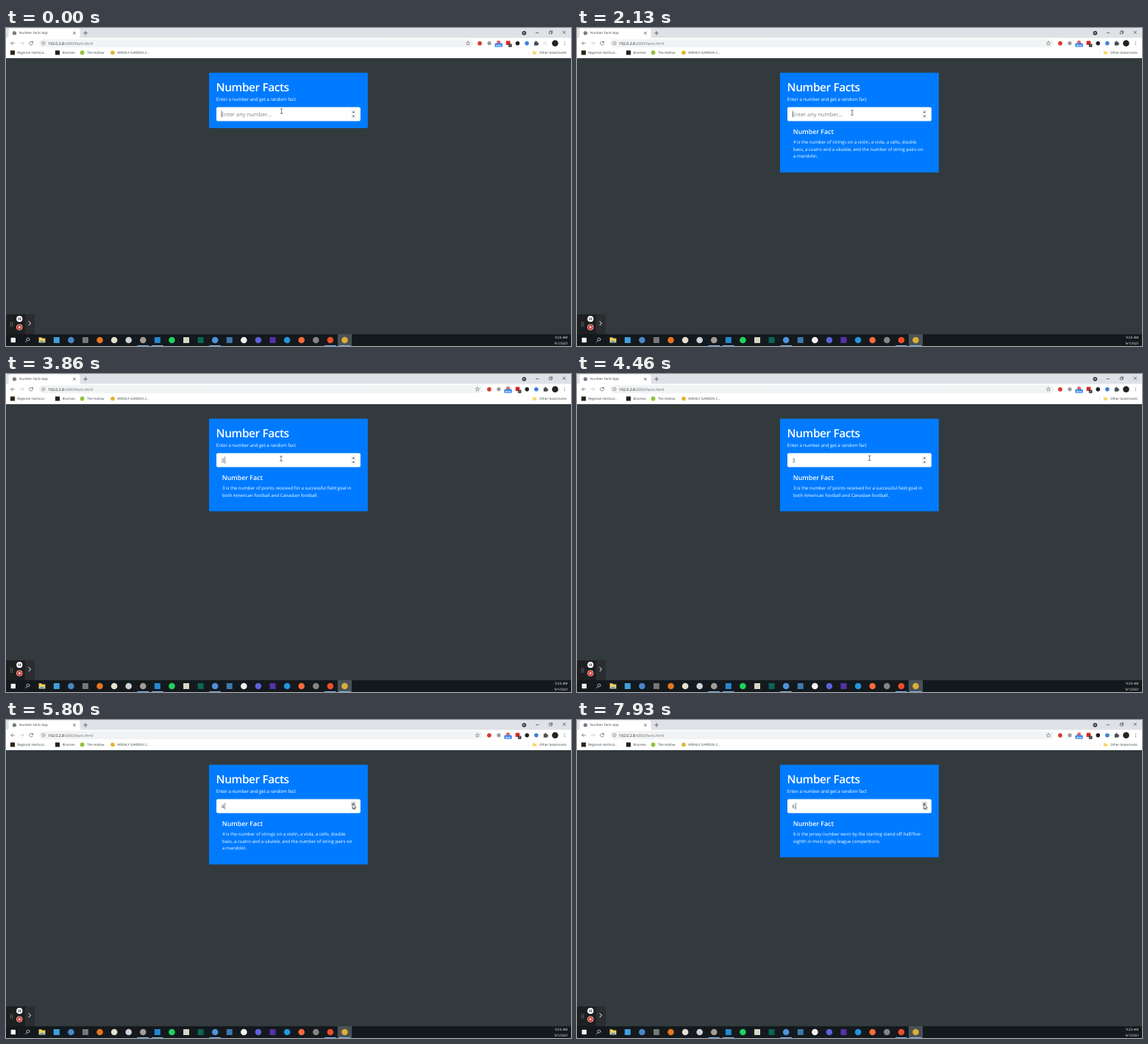
An HTML page that plays this animation: 768 by 432 pixels, repeating every 8000 ms.

```html
<!DOCTYPE html>
<html lang="en">
<head>
<meta charset="utf-8">
<title>Number Facts App</title>
<style>
  html, body { margin: 0; width: 100%; height: 100%; overflow: hidden; background: #333a3e; }
  svg { display: block; width: 100vw; height: 100vh; }
  text { font-family: "Open Sans", "Noto Sans", sans-serif; text-rendering: geometricPrecision; white-space: pre; }
  .heading { font-weight: 600; letter-spacing: -0.026em; }
  .line { fill: none; stroke-linecap: round; stroke-linejoin: round; }
</style>
</head>
<body>
<svg id="stage" viewBox="0 0 768 432"></svg>
<script>
const LOOP = 8000, BLINK = 580;
const stage = document.getElementById('stage');

const rect = (x, y, w, h, fill, r = 0, extra = '') =>
  `<rect x="${x}" y="${y}" width="${w}" height="${h}" rx="${r}" fill="${fill}" ${extra}/>`;
const disc = (x, y, r, fill, extra = '') => `<circle cx="${x}" cy="${y}" r="${r}" fill="${fill}" ${extra}/>`;
const box = (x, y, size, fill) => rect(x - size / 2, y - size / 2, size, size, fill, 0.6);
const line = (d, color, width = 0.7, extra = '') =>
  `<path class="line" d="${d}" stroke="${color}" stroke-width="${width}" ${extra}/>`;
const shape = (d, fill, extra = '') => `<path d="${d}" fill="${fill}" ${extra}/>`;
const text = (x, y, size, fill, content, extra = '') =>
  `<text x="${x}" y="${y}" font-size="${size}" fill="${fill}" ${extra}>${content}</text>`;
const folder = (x, y, w, h, fill) =>
  shape(`M${x} ${y}h${w * 0.4}l${w * 0.1} ${h * 0.16}h${w * 0.5}v${h * 0.84}h${-w}z`, fill);

function tabStrip() {
  return rect(0, 0, 768, 14, '#dee1e6') +
    shape('M1 14Q3.5 14 3.5 11V3Q3.5 0.5 6 0.5H98Q100.5 0.5 100.5 3V11Q100.5 14 103 14Z', '#fff') +
    disc(11.5, 6.8, 2.6, '#5f6368') +
    line('M9.6 5.8q1.2 .2 1.6 1.2t1.4 1.2M11.8 4.6q0 1.2 1.6 1.3', '#fff', 0.5) +
    text(17.8, 8.4, 4.5, '#3c4043', 'Number Facts App') +
    line('M91.4 5.4l3 3m0-3l-3 3', '#3c4043') +
    line('M105.6 6.9h5M108.1 4.4v5', '#3c4043') +
    disc(704.3, 6.8, 2.9, '#3c4043') + shape('M702.9 6h2.8l-1.4 1.8z', '#dee1e6') +
    line('M720.3 6.6h3.6', '#222', 0.6) +
    line('M738.6 4.9h3v3h-3zM739.6 4.9v-1h3v3h-1', '#222', 0.5) +
    line('M756.9 4l3.6 3.6m0-3.6l-3.6 3.6', '#222', 0.6);
}

function extensions() {
  return line('M628 18l.8 1.8 1.9.2-1.4 1.3.4 1.9-1.7-1-1.7 1 .4-1.9-1.4-1.3 1.9-.2z', '#5f6368', 0.55) +
    disc(644, 20.8, 2.9, '#d93a2f') +
    disc(657, 20.7, 2.6, '#9a9da1') +
    disc(669.6, 19.6, 2.6, '#e0685c') + rect(664.6, 20.8, 10.2, 5, '#2f80ed', 0.8) +
    text(669.7, 24.6, 3.2, '#fff', 'NEW', 'text-anchor="middle" font-weight="700"') +
    box(682.6, 20.2, 5.6, '#d5281e') + rect(683, 21.6, 4.6, 4.4, '#3c4043', 0.7) +
    text(685.3, 25.2, 3.4, '#fff', '2', 'text-anchor="middle"') +
    disc(695.4, 20.7, 2.8, '#202124') +
    disc(708, 20.7, 2.8, '#3f7fd8') +
    shape('M718 19h1.6a1 1 0 1 1 1.8 0h1.6v1.6a1 1 0 1 1 0 1.8v1.3h-5z', '#4a4d51');
}

function toolbar() {
  return rect(0, 13.4, 768, 27.6, '#fff') +
    `<rect id="omnibox" x="45" y="15.2" width="590" height="11" rx="5.5" fill="#f1f3f4"/>` +
    line('M11.4 20.7h-4.6m2.1-2.1l-2.1 2.1 2.1 2.1', '#5f6368') +
    line('M19.4 20.7h4.6m-2.1-2.1l2.1 2.1-2.1 2.1', '#bdc1c6') +
    line('M36 19.1a2.4 2.4 0 1 0 .4 2.2', '#5f6368') + shape('M36.7 17.6v2.4h-2.4z', '#5f6368') +
    line('M53.1 20.6a2.3 2.3 0 1 1-4.6 0a2.3 2.3 0 1 1 4.6 0M50.8 20.5v1.2M50.8 19.3v.05', '#5f6368', 0.5) +
    text(57, 22.5, 5.2, '#202124', '192.0.2.8<tspan fill="#6a6e73">:4300/facts.html</tspan>') +
    `<g id="extensions">${extensions()}</g>` +
    `<g id="mediaIcon">${line('M730.6 19h4.6M730.6 20.8h3M730.6 22.6h2M735.6 20.8v2.2', '#c4c7cb', 0.6)}</g>` +
    disc(746.4, 20.7, 4.3, '#24231f') +
    [18.8, 20.7, 22.6].map(y => disc(759.2, y, 0.55, '#5f6368')).join('') +
    box(9, 33.5, 6.2, '#2b271a') + text(15.2, 35.1, 4.5, '#3c4043', 'Regional Horticul...') +
    box(70, 33.5, 6.2, '#222') + text(76.7, 35.1, 4.5, '#3c4043', 'Brumeo') +
    disc(103.6, 33.5, 2.9, '#94c13d') + text(110, 35.1, 4.5, '#3c4043', 'The Hollow') +
    disc(145, 33.5, 2.8, '#e3b22c') + text(151.3, 35.1, 4.5, '#3c4043', 'WEEKLY GARDEN 2...') +
    line('M711 30.5v6', '#dadce0', 0.4) + folder(715.7, 31.2, 5.4, 4.6, '#f8d775') +
    text(725, 35.1, 4.5, '#3c4043', 'Other bookmarks');
}

function card() {
  return `<rect id="card" x="276" y="60.8" width="215.8" rx="1.2" fill="#007bff"/>` +
    text(285.6, 85.8, 15.4, '#fff', 'Number Facts', 'class="heading"') +
    text(285.8, 98.6, 6.2, '#fff', 'Enter a number and get a random fact', 'letter-spacing="-.07"') +
    rect(286, 107.4, 195.8, 19, '#fff', 1.9) +
    text(292.6, 119.8, 7.45, '#6c757d', '', 'id="value"') +
    `<rect id="caret" y="112.3" width=".55" height="9.4" fill="#343a40"/>` +
    rect(469.2, 111.2, 6.2, 11.6, '#f0f0f0') +
    `<rect id="upButton" x="469.2" y="111.2" width="6.2" height="5.8"/>` +
    shape('M470.7 115l1.6-1.9 1.6 1.9z', '#505050') + shape('M470.7 119.1h3.2l-1.6 1.9z', '#505050') +
    `<g id="fact">${text(293.8, 143.6, 8.8, '#fff', 'Number Fact', 'class="heading" style="letter-spacing:0"')}` +
    [0, 1, 2].map(i => text(294, 157 + i * 9.6, 6.05, '#fff', '', 'class="factLine"')).join('') + '</g>';
}

function recorder() {
  const dots = [400, 402.4, 404.8].map(y => disc(6.4, y, 0.6, '#aaa') + disc(8.8, y, 0.6, '#aaa')).join('');
  return rect(0, 389, 38.5, 27, '#1d1f21', 1.5) + rect(26, 389, 12.5, 27, '#2b2d30', 1.5) + dots +
    disc(18.3, 395.2, 4.1, '#fff') + line('M17.2 393.8v2.8M19.4 393.8v2.8', '#222', 0.9) +
    disc(18.3, 406.5, 4.1, '#fff') + disc(18.3, 406.5, 3.5, '#d9362b') + box(18.3, 406.5, 2.4, '#fff') +
    line('M31 398.6l2.5 2.6-2.5 2.6', '#fff', 1);
}

function taskbar() {
  // "o" draws a disc, "s" a square; icons follow one another at an even pitch.
  const icons = 's#3f9fdc o#4a86c6 s#777 o#e8761f o#e5e0d0 o#cfd3d8 o#a49c95 s#2587d0 o#1fd35f s#d9d5c4 ' +
    's#0b6656 o#4d93dc s#3d78ad o#f2f2f2 o#5c62d8 s#5631a8 o#2595da o#f76b3b o#858585 o#ee4e2b o#dcae37';
  const pitch = 19.58;
  const drawIcon = (code, i) => {
    const x = 68.8 + i * pitch, color = code.slice(1);
    return code[0] === 'o' ? disc(x, 424, 4.3, color) : box(x, 424, 8, color);
  };
  const active = [6, 7, 11, 19, 20].map(i => rect(61 + i * pitch, 431, 15.5, 1, '#76b9ed')).join('');
  return rect(0, 416, 768, 16, '#14191d') + rect(450.8, 416, 19.2, 16, '#4a5156') +
    box(9.8, 424, 6.4, '#f4f4f4') +
    line('M31.9 423a2 2 0 1 1-4 0a2 2 0 1 1 4 0M28.4 424.6l-2 2.2', '#e8e8e8', 0.7) +
    folder(44.6, 420.2, 8.8, 7.4, '#f5cd5c') + rect(46.6, 425, 4.8, 2.6, '#4aa3e0') +
    icons.split(' ').map(drawIcon).join('') + active +
    text(754.8, 422.1, 4.5, '#fff', '9:25 AM', 'text-anchor="middle"') +
    text(754.8, 430.4, 4.5, '#fff', '9/1/2021', 'text-anchor="middle"');
}

function pointer() {
  return `<circle id="ring" r="12.8" fill="none" stroke="#e0242f" stroke-width="1.1"/>` +
    `<g id="ibeam">${line('M-1.5 -3.2h1.1l.4.4.4-.4h1.1M0 -2.8v5.6M-1.5 3.2h1.1l.4-.4.4.4h1.1', '#222', 0.6)}</g>` +
    `<g id="arrow">${shape('M-.8 -1.6v6.8l1.6-1.5 1 2.3 1.1-.5-1-2.2h2.1z', '#fff', 'stroke="#222" stroke-width=".6"')}</g>`;
}

stage.innerHTML = rect(0, 0, 768, 432, '#333a3e') + tabStrip() + toolbar() + card() + recorder() + taskbar() +
  `<g id="pointer">${pointer()}</g>`;

const el = id => document.getElementById(id);
const factLines = [...document.querySelectorAll('.factLine')];

const FACTS = {
  3: ['3 is the number of points received for a successful field goal in',
    'both American football and Canadian football.'],
  4: ['4 is the number of strings on a violin, a viola, a cello, double',
    'bass, a cuatro and a ukulele, and the number of string pairs on', 'a mandolin.'],
  6: ['6 is the jersey number worn by the starting stand-off half/five-',
    'eighth in most rugby league competitions.']
};
const VALUES = [[0, ''], [800, '4'], [2130, ''], [3330, '3'], [5330, '4'], [6800, '5'], [7360, '6']];
const SHOWN = [[0, ''], [1400, 4], [3800, 3], [5800, 4], [7730, 6]];
const CLICKS = [5330, 6800, 7360];
const PATH = [[0, 374.5, 113], [1200, 374.2, 113], [1600, 374, 115], [4200, 374, 115],
  [5000, 468.6, 112], [5060, 468.8, 112], [5300, 472, 115.5], [7060, 472, 115.5], [7260, 472.4, 116], [LOOP, 472.4, 116]];

const latest = (steps, t) => steps.filter(step => step[0] <= t).pop();

function along(path, t) {
  const i = path.findIndex(point => point[0] > t);
  const [t0, x0, y0] = path[i - 1], [t1, x1, y1] = path[i];
  const k = (t - t0) / (t1 - t0), ease = k * k * (3 - 2 * k);
  return [x0 + (x1 - x0) * ease, y0 + (y1 - y0) * ease];
}

const show = (id, visible) => el(id).setAttribute('visibility', visible ? 'visible' : 'hidden');

function render(t) {
  const [typedAt, value] = latest(VALUES, t);
  el('value').textContent = value || 'Enter any number...';
  el('value').setAttribute('fill', value ? '#495057' : '#7b838a');
  el('caret').setAttribute('x', value ? 297 : 292.8);
  show('caret', Math.floor((t - typedAt) / BLINK) % 2 === 0);

  const lines = FACTS[latest(SHOWN, t)[1]] || [];
  el('card').setAttribute('height', lines.length ? 106.6 + 9.6 * lines.length : 75.2);
  show('fact', lines.length);
  factLines.forEach((node, i) => { node.textContent = lines[i] || ''; });

  const shifted = t >= 1600;
  el('extensions').setAttribute('transform', `translate(${shifted ? 12.8 : 0} 0)`);
  el('omnibox').setAttribute('width', shifted ? 603 : 590);
  show('mediaIcon', !shifted);

  const [x, y] = along(PATH, t);
  const overSpinner = x > 469.2;
  const age = Math.min(...CLICKS.filter(at => at <= t).map(at => t - at));
  el('pointer').setAttribute('transform', `translate(${x} ${y})`);
  show('ibeam', !overSpinner);
  show('arrow', overSpinner);
  el('ring').setAttribute('cy', -1.5);
  el('ring').setAttribute('opacity', Math.max(0, Math.min(1, (260 - age) / 130)));
  el('upButton').setAttribute('fill', !overSpinner ? 'none' : age < 130 ? '#777' : '#d2d2d2');
}

const start = performance.now();
function tick() {
  render((performance.now() - start) % LOOP);
  requestAnimationFrame(tick);
}
tick();
</script>
</body>
</html>
```
